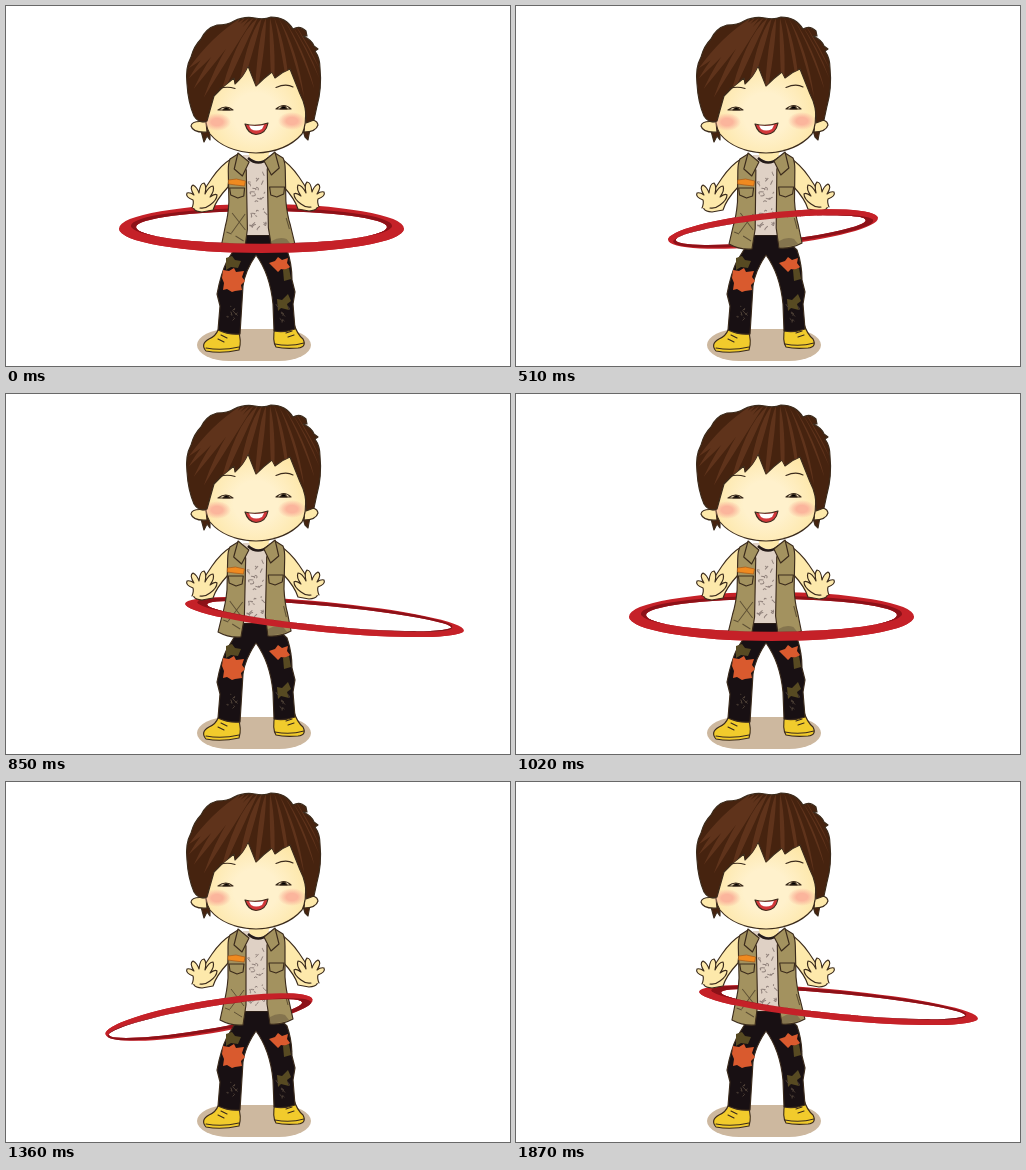
These frames come from a looping animation (504 px wide and 360 px high, 2.04 s). An HTML page:

```html
<!DOCTYPE html>
<html lang="en">
<head>
<meta charset="utf-8">
<title>Hula hoop</title>
<style>
html, body { margin: 0; width: 100%; height: 100%; overflow: hidden; background: #fff; }
svg { display: block; width: 504px; height: 360px; }
.ink { stroke: #3b2b1c; stroke-width: 1.15; stroke-linejoin: round; stroke-linecap: round; }
.line { fill: none; }
.skin { fill: #fde9ab; }
.vest { fill: #a3925f; }
.shoe { fill: #f1cb2c; }
.hoop { fill: #c52128; }
.wall { fill: #8d1118; }
</style>
</head>
<body>
<svg viewBox="0 0 504 360">
<defs>
  <radialGradient id="skin" cx=".5" cy=".6" r=".55">
    <stop offset=".4" stop-color="#fff1cc"/><stop offset="1" stop-color="#fde6a6"/>
  </radialGradient>
  <radialGradient id="blush">
    <stop offset=".4" stop-color="#fbb59c"/><stop offset="1" stop-color="#fbb59c" stop-opacity="0"/>
  </radialGradient>
  <path id="hair" d="M201 115Q193 118 188 110Q182 96 181 78Q179 62 185 51Q188 40 195 33Q200 22 211 19Q222 19 228 15Q238 10 249 12Q258 14 265 11Q280 11 287 23Q294 19 300 25L301 30L297 30Q306 34 308 40L312 43L309 45Q314 52 314 62Q316 82 311 100L308 114L300 117Q301 101 294 88L284 63Q276 66 269 72L266 66Q258 72 250 80L242 60Q238 70 229 78L228 72Q217 80 208 90Q204 104 201 115Z"/>
  <clipPath id="hairClip"><use href="#hair"/></clipPath>
  <g id="arm" class="ink skin">
    <path d="M225 153Q215 159 206 172L190 196Q183 205 196 206L207 204Q210 194 222 181Z"/>
    <path d="M186 202Q188 197 187 194Q179 191 181 187Q184 186 188 189Q183 181 187 179Q191 181 193 187Q194 177 198 177Q201 180 199 188Q203 180 207 180Q209 184 204 191Q209 187 211 189Q211 194 204 199Q199 203 194 202"/>
  </g>
  <g id="vest" class="ink vest">
    <path d="M232 148L224 153Q222 157 222 165V196Q221 210 218 220L214 238Q225 244 237 243L240 223V164Z"/>
    <path d="M232 147L228 163L236 170L243 156Z"/>
    <path class="line" d="M223 182H238L237 190L231 192L224 189Z"/>
  </g>
</defs>

<rect x="191" y="323" width="114" height="32" rx="32" ry="16" fill="#cdb89f"/>
<g id="back"><path class="hoop"/><path class="wall"/></g>

<path class="ink shoe" d="M212 324H232Q236 335 233 344Q215 348 200 345Q194 338 203 333Q210 330 212 324Z"/>
<path class="ink shoe" d="M269 320L288 318Q291 328 297 333Q301 341 292 342Q278 343 270 341Q266 335 269 320Z"/>
<path class="ink line" d="M200 342Q216 345 233 341M212 333l6 3M215 329l6 3M269 338Q284 341 298 337M282 331l6-2M280 327l6-2"/>
<path class="ink" fill="#181013" d="M237 229H265L281 244Q286 258 286 274L289 286L287 298L289 323Q278 327 268 325L267 298Q264 268 250 249Q239 265 237 280L234 328Q222 329 212 324L214 300L211 288Q215 267 221 255Z"/>
<path fill="#d95a2e" d="M217 264l6 1 5-3 2 4 8-1-2 6 3 4-4 4 1 5-7 1-3 1-5-3-4 1 1-7-2-5zM263 257l6-2 3-4 4 3 6-2-1 5 3 4-4 3-5-1-3 3-4-4z"/>
<path fill="#574a22" d="M220 252l6-2 3 4 6 1-3 7-7-1-5 3zM277 264l6-2 2 11-7 2zM271 293l5 1 6-6 3 7-4 3 2 6-8-2-3 3z"/>
<g id="seams" class="line" stroke="#4f4238"/>

<use href="#arm"/>
<use href="#arm" transform="matrix(-1 0 0 1 499 -1)"/>

<g id="top">
  <path fill="#dfd1c5" d="M237 149H266L264 229H238Z"/>
  <g id="print" class="line" stroke="#8f807a"/>
  <path class="skin" d="M242 145H264L261 153Q252 158 244 152Z"/>
  <path class="line" stroke="#241b18" stroke-width="2.4" d="M242 152Q252 161 263 152"/>
  <use href="#vest"/>
  <use href="#vest" transform="matrix(-1 0 0 1 501 -1)"/>
  <path class="line" stroke="#5f5135" d="M225 207l13 17M238 208L224 227M228 230l8 5M219 226l5 2M279 212l3 11"/>
  <path fill="#6f6142" opacity=".6" d="M264 235q8-5 15-2l4 5q-9 4-19 3z"/>
  <path fill="#f08a20" stroke="#a95a18" stroke-width=".7" d="M222 174l8-1 9 2-1 5-9-1-7-1z"/>
</g>

<path class="ink" fill="#46230f" d="M194 121L198 136L201 130L204 134V120ZM296 121L299 131L302 134L305 118Z"/>
<path class="ink skin" d="M200 116Q186 114 185 120Q187 127 201 126ZM299 115Q311 112 312 119Q310 126 298 126Z"/>
<path class="ink" fill="url(#skin)" d="M210 50Q193 112 204 128Q219 146 250 147Q280 146 296 128Q305 112 292 50Z"/>
<ellipse cx="211" cy="116" rx="14" ry="9" fill="url(#blush)"/>
<ellipse cx="286" cy="115" rx="14" ry="9" fill="url(#blush)"/>
<use href="#hair" class="ink" fill="#46230f"/>
<g id="streaks" clip-path="url(#hairClip)" fill="#6d3d22" opacity=".65"/>
<path class="ink line" stroke-width="2" d="M214 82.500Q221 80 229 82.500M270 81.500Q280 77 287 81"/>
<g class="ink">
  <path fill="#fff1cc" d="M212 104Q220 98 227 104ZM270 103Q278 96 285 103Z"/>
  <path d="M217 104Q220 99 224 104ZM274 103Q278 97 281 103Z"/>
</g>
<path class="ink" fill="#d2383a" d="M239 118Q250 121 262 117Q260 128 250 128.500Q242 128 239 118Z"/>
<path fill="#fff" d="M243 119.500Q251 120.500 258 119L256 123Q250 126 245 123Z"/>

<g id="front"><path class="hoop"/><path class="wall"/></g>
</svg>
<script>
const { PI, cos, sin, floor } = Math;
const STEP = 170;
const get = id => document.getElementById(id);

// key poses of one turn: centre x, y, tilt, radii, band width at the ends
const poses = [
  [255.5, 222.5, 0, 142.5, 24.5, 17],
  [178, 229, -6, 140, 15, 17],
  [203, 235, -9.5, 105, 16.5, 7],
  [257, 223, -6, 105.5, 16.5, 10],
  [308.5, 215, 1, 113.5, 19, 12.5],
  [318.5, 223, 5.5, 140, 15, 17]
];

let seed = 7;
const random = () => (seed = seed * 16807 % 2147483647) / 2147483647;

function scribble(id, count, x, y, w, h) {
  let d = '';
  const jump = () => `${random() * 8 - 4} ${random() * 8 - 4}`;
  while (count--) d += `M${x + random() * w} ${y + random() * h}q${jump()} ${jump()}`;
  get(id).innerHTML += `<path d="${d}"/>`;
}

function combHair(count) {
  let d = '';
  for (let k = 0; k < count; k++) {
    const t = k / (count - 1), a = PI * (1.05 - 1.1 * t);
    const sx = 235 + 50 * t, ex = 248 + 66 * cos(a), ey = 68 + 36 * sin(a);
    const mx = (sx + ex) / 2;
    d += `M${sx} 12Q${mx - 3} 30 ${ex} ${ey}Q${mx + 6} 42 ${sx} 12`;
  }
  get('streaks').innerHTML = `<path d="${d}"/>`;
}

function halfRing([x, y, rx, ry], [u, v, ru, rv], upper) {
  return `M${x - rx} ${y}A${rx} ${ry} 0 0 ${upper} ${x + rx} ${y}` +
    `L${u + ru} ${v}A${ru} ${rv} 0 0 ${1 - upper} ${u - ru} ${v}Z`;
}

function drawHoop(id, [cx, cy, tilt, rx, ry, band], shift, low, halves) {
  const dx = tilt * (low ? .9 : .4), dy = low ? -1.2 : .8;
  const hole = [dx, dy, rx - band, ry * .67];
  const rim = [0, dy + (low ? -1.5 : 1.5), rx - band + 5, ry * .67 + 1.5];
  const group = get(id);
  group.setAttribute('transform', `translate(${cx + shift} ${cy}) rotate(${tilt})`);
  [[0, 0, rx, ry], rim].forEach((edge, i) =>
    group.children[i].setAttribute('d', halves.map(h => halfRing(edge, hole, h)).join('')));
}

function draw() {
  const i = floor(performance.now() / STEP) % 12;
  const pose = poses[i % 6];
  const low = cos(i * PI / 3) > 0.1;               // near half is the lower one
  const shift = i > 6 ? 4 * cos((i - 7) * PI / 2) : 0;  // second turn wobbles
  drawHoop('back', pose, shift, low, [0, 1]);
  drawHoop('front', pose, shift, low, [low ? 0 : 1]);
  const lean = 2 * cos((i + 1) * PI / 6) / 90;
  get('top').setAttribute('transform', `matrix(1 0 ${lean} 1 ${-150 * lean} 0)`);
  requestAnimationFrame(draw);
}

scribble('print', 26, 243, 163, 15, 62);
scribble('seams', 7, 219, 297, 12, 20);
scribble('seams', 6, 273, 300, 9, 16);
combHair(13);
draw();
</script>
</body>
</html>
```
